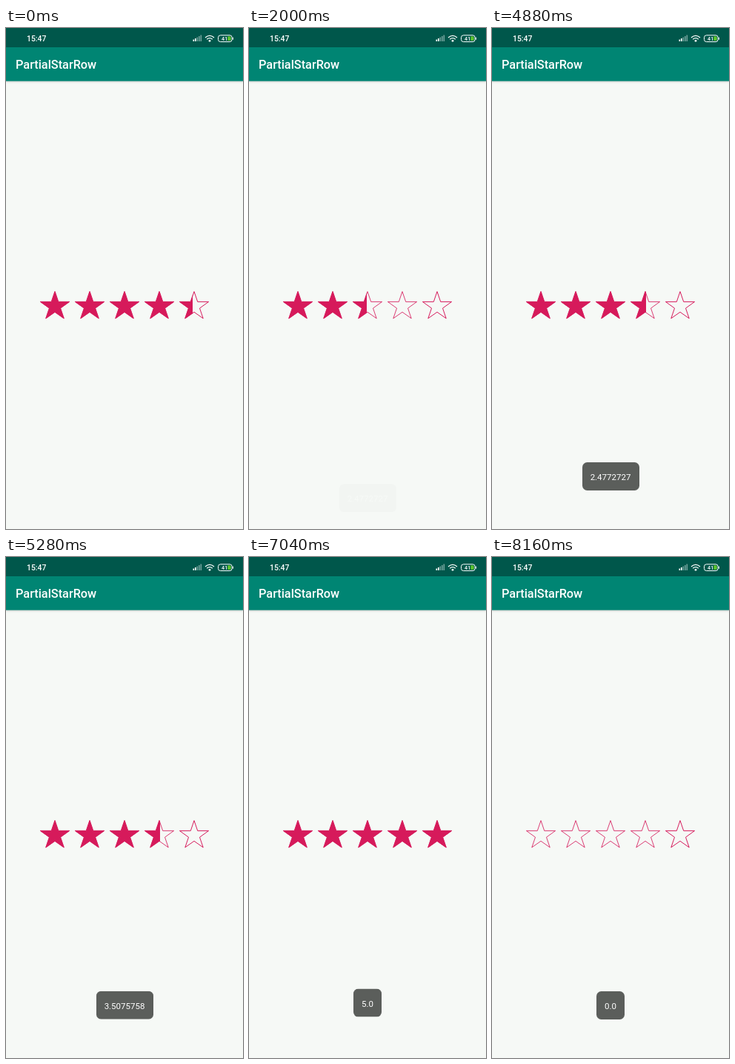
Write an HTML page without scripts that moves like this. It is 320 by 676 pixels and loops after 9.48 s.

```html
<!DOCTYPE html>
<html lang="en">
<head>
<meta charset="utf-8">
<title>Rating bar</title>
<style>
  :root { --loop: 9480ms; --accent: #d61a5b; }
  html, body { margin: 0; width: 100%; height: 100%; overflow: hidden; background: #f6f9f6; }
  .stage { position: relative; width: 320px; height: 676px; overflow: hidden; font-family: Roboto, sans-serif; color: #fff; }
  .stage > * { position: absolute; }
  svg { display: block; }

  .status { left: 0; top: 0; width: 320px; height: 26px; background: #00574b; }
  .bar { left: 0; top: 26px; width: 320px; height: 45px; background: #008573; border-bottom: 1px solid #459f92; box-shadow: 0 1px 2px rgba(0, 0, 0, .16); }
  .clock, .title { font-weight: 500; white-space: nowrap; }
  .clock { left: 28px; top: 8px; font-size: 10.4px; line-height: 13px; }
  .title { left: 13px; top: 40px; font-size: 16.3px; line-height: 20px; }

  .stars { left: 46px; top: 350px; width: 228px; height: 50px; }
  .outline, .solid { fill: none; stroke: var(--accent); stroke-width: .85; stroke-linejoin: round; }
  .outline .last { stroke-width: 1; }
  .solid { fill: var(--accent); }
  .fill { overflow: hidden; animation: drag var(--loop) ease-in-out infinite; }

  @keyframes drag {
    0%, .42% { width: 206px; }
    2.1% { width: 214px; }
    10.97% { width: 24px; }
    20.68%, 31.22% { width: 113.3px; }
    37.97% { width: 228px; }
    41.35% { width: 220px; }
    46.41% { width: 120px; }
    50.63%, 67.51% { width: 161.5px; }
    71.31%, 78.48% { width: 228px; }
    81.86%, 100% { width: 0; }
  }

  .toast {
    left: 121.5px; top: 586px; width: 77px; height: 38px; border-radius: 6.5px;
    background: #5b5e5b; font-size: 11.5px; line-height: 40px; text-align: center; opacity: 0;
    animation: rise var(--loop) ease-out calc(var(--in) - var(--loop)) infinite,
               var(--show) var(--loop) linear infinite;
  }
  .short { left: 141px; width: 38px; }
  .a { --in: 2000ms; --show: show-a; }
  .b { --in: 4920ms; --show: show-b; }
  .c { --in: 6800ms; --show: show-c; }
  .d { --in: 7760ms; --show: show-d; }

  @keyframes rise {
    0% { transform: translateY(29.5px); }
    2.53% { transform: translateY(-3.5px); }
    4.22%, 100% { transform: none; }
  }
  @keyframes show-a {
    0%, 21% { opacity: 0; }
    21.1% { opacity: .02; }
    23.2%, 51.5% { opacity: 1; }
    53.2%, 100% { opacity: 0; }
  }
  @keyframes show-b {
    0%, 51.9% { opacity: 0; }
    54%, 71.73% { opacity: 1; }
    73.4%, 100% { opacity: 0; }
  }
  @keyframes show-c {
    0%, 71.73% { opacity: 0; }
    73.8%, 81.86% { opacity: 1; }
    83.5%, 100% { opacity: 0; }
  }
  @keyframes show-d {
    0%, 81.86% { opacity: 0; }
    84%, 100% { opacity: 1; }
  }
</style>
</head>
<body>
<div class="stage">
  <div class="bar"></div>
  <div class="status"></div>
  <div class="clock">15:47</div>
  <div class="title">PartialStarRow</div>

  <svg style="left:248px;top:6px" width="64" height="16" viewBox="248 6 64 16">
    <g fill="#fff">
      <path d="M252.5 15.5h1.6v2.5h-1.6zM255 14h1.6v4H255z"/>
      <path opacity=".45" d="M257.5 12.5h1.6v5.5h-1.6zM260 11h1.6v7H260zM262.5 9.5h1.6V18h-1.6z"/>
      <circle cx="275" cy="17.3" r="1.4"/>
    </g>
    <path d="M269 12.9q6-5 12 0M271.2 15.2q3.8-3 7.6 0" fill="none" stroke="#fff" stroke-width="1.3"/>
    <rect x="286.5" y="9.8" width="18.6" height="8.8" rx="3" fill="#00574b" stroke="#fff"/>
    <path d="M299.3 11.3h2.8q1.6 0 1.6 1.6v2.6q0 1.6-1.6 1.6h-2.8z" fill="#5cc42c"/>
    <path d="M306.4 12.6v3.2" stroke="#fff"/>
    <text x="295.2" y="16.8" font-size="7.2" font-weight="500" text-anchor="middle" fill="#fff">41</text>
  </svg>

  <svg class="stars outline" viewBox="46 350 228 50" overflow="visible">
    <defs>
      <path id="star" d="M0-20 4.7-6.2 19.6-6.2 7.5 2.5 12.2 16.3 0 7.7-12.2 16.3-7.5 2.5-19.6-6.2-4.7-6.2Z"/>
      <g id="four">
        <use href="#star" x="66" y="375.6"/>
        <use href="#star" x="113" y="375.6"/>
        <use href="#star" x="160" y="375.6"/>
        <use href="#star" x="207" y="375.6"/>
      </g>
    </defs>
    <use href="#four"/>
    <use href="#star" x="254" y="375.6" class="last"/>
  </svg>
  <div class="stars fill">
    <svg class="solid" width="228" height="50" viewBox="46 350 228 50">
      <use href="#four"/>
      <use href="#star" x="254" y="375.6"/>
    </svg>
  </div>

  <div class="toast a">2.4772727</div>
  <div class="toast b">3.5075758</div>
  <div class="toast short c">5.0</div>
  <div class="toast short d">0.0</div>
</div>
</body>
</html>
```
